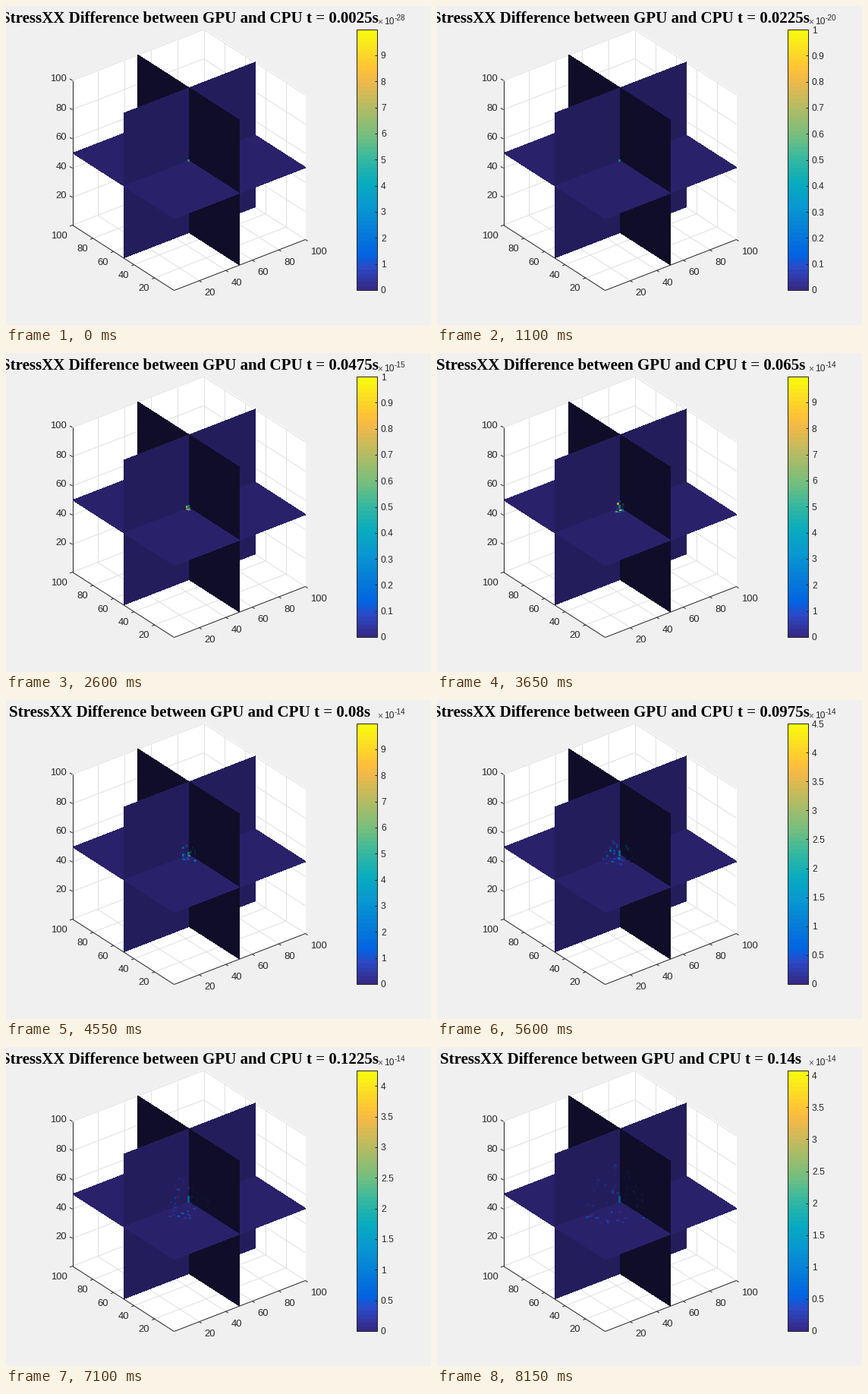
A matplotlib script for the animation above (8.3 s loop, 560 px wide and 420 px high).

```python
import math
import numpy as np
import matplotlib.pyplot as plt
from matplotlib.animation import FuncAnimation
from matplotlib.collections import LineCollection, PolyCollection
from matplotlib.colors import LinearSegmentedColormap
from matplotlib.patches import Polygon, Rectangle

W, H, DPI = 560, 420, 100
STEP_MS, FRAMES = 50, 166
INK, GRID = "#262626", "#dfdfdf"

# Projection: screen vectors of the three axes from the front bottom corner
ORIGIN = np.array([222, 374])
EX, EY, EZ = np.array([173, -67]), np.array([-134, -86]), np.array([0, -190.5])
TICKS = range(20, 101, 20)
MID = 49 / 99
SHADE = {"x": 0.30, "y": 0.68, "z": 0.79}

STOPS = {0: "#352a87", 5: "#2c4ac7", 8: "#0363e1", 20: "#0998d1", 26: "#0aacbe",
         32: "#38b99e", 37: "#71bf80", 51: "#f1b94a", 54: "#ffc337", 63: "#f9fb0e"}
cmap = LinearSegmentedColormap.from_list(
    "heat", [(i / 63, c) for i, c in STOPS.items()], N=64)

fig = plt.figure(figsize=(W / DPI, H / DPI), dpi=DPI, facecolor="#f0f0f0")
ax = fig.add_axes([0, 0, 1, 1])
ax.axis("off")


def proj(x, y, z):
    return ORIGIN + x * EX + y * EY + z * EZ


def shaded(value, face):
    return np.array(cmap(value)[:3]) * SHADE[face]


def text(x, y, s, size, ha="left", font="Liberation Sans", **kw):
    return ax.text(x, y, s, fontsize=size * 72 / DPI, ha=ha, va="baseline",
                   family=font, **{"color": INK, **kw})


def lines(segs, color, z):
    lc = LineCollection([np.array(s) + (-0.5, 0.5) for s in segs],
                        colors=color, linewidths=0.72, zorder=z)
    return ax.add_collection(lc)


def face_patch(corners, color, z):
    ax.add_patch(Polygon([proj(*p) for p in corners], fc=color, ec="none",
                         antialiased=False, zorder=z))


def plane(axis, at, u=(0, 1), v=(0, 1)):
    """Corners of a rectangle perpendicular to one axis."""
    pairs = [(u[0], v[0]), (u[1], v[0]), (u[1], v[1]), (u[0], v[1])]
    return [np.insert(np.array(p, float), axis, at) for p in pairs]


def draw_box():
    for axis, at in enumerate((1, 1, 0)):
        face_patch(plane(axis, at), "white", 1)
    grid, marks = [], []
    for t in TICKS:
        f = (t - 1) / 99
        for a, b, c in [((f, 0, 0), (f, 1, 0), (f, 1, 1)),
                        ((0, f, 0), (1, f, 0), (1, f, 1)),
                        ((0, 1, f), (1, 1, f), (1, 0, f))]:
            grid += [(proj(*a), proj(*b)), (proj(*b), proj(*c))]
        px, py, pz = proj(f, 0, 0), proj(0, f, 0), proj(0, 1, f)
        marks += [(px, px + (3, 2)), (py, py + (-3.5, 1.4)), (pz, pz + (-3.5, -2))]
        text(px[0] + 6.4, px[1] + 20, str(t), 13)
        text(py[0] - 7.5, py[1] + 18, str(t), 13, "right")
        text(pz[0] - 8, pz[1] + 1.7, str(t), 13, "right")
    lines(grid, GRID, 2)
    corners = [(0, 1, 1), (0, 1, 0), (0, 0, 0), (1, 0, 0)]
    edges = [(proj(*a), proj(*b)) for a, b in zip(corners, corners[1:])]
    lines(edges + marks, INK, 3)


def draw_slices():
    halves = [(0, MID), (MID, 1)]
    view = np.array([.527, .687, -.5])
    quads = [(name, plane(axis, MID, u, v)) for axis, name in enumerate("xyz")
             for u in halves for v in halves]
    quads.sort(key=lambda q: -np.mean(q[1], axis=0) @ view)
    for i, (name, corners) in enumerate(quads):
        face_patch(corners, shaded(0, name), 4 + i * 0.1)


def draw_bar():
    ax.imshow(np.linspace(1, 0, 64)[:, None], cmap=cmap, extent=(462, 489, 374, 31),
              aspect="auto", interpolation="nearest", zorder=5)
    ax.add_patch(Rectangle((461.5, 30.5), 27.5, 343, fc="none", ec=INK, lw=0.72, zorder=6))


draw_box()
draw_slices()
draw_bar()
ax.set_xlim(0, W)
ax.set_ylim(H, 0)
title = text(242, 22, "", 21, "center", "Liberation Serif", weight="bold", color="black")
text(489.5, 24.5, "×", 12, color="#555555")
text(498, 24.5, "10", 12)
power = text(512, 19, "", 10)
tick_texts = [text(494, 0, "", 12) for _ in range(12)]
bar_ticks = lines([], INK, 7)
cells = ax.add_collection(PolyCollection([], edgecolors="none", antialiased=False, zorder=6))


def color_limit(k):
    """Mantissa and exponent of the colour scale's upper end."""
    if k >= 36:
        return 4.5 - 0.025 * (k - 38), -14
    e = -13 - round(14 * max(0, 1 - k / 32) ** 2.4)
    # these powers of ten round to just below a whole decade
    return (9.99, e - 1) if e in (-27, -13) else (1, e)


def cell(face, a, b):
    """Grid cell a, b steps away from the centre on the near part of a slice."""
    c, d = proj(MID, MID, MID), 1 / 99
    u, v = {"x": (-EY, EZ), "y": (-EX, EZ), "z": (-EX, -EY)}[face]
    return [c + d * ((a + i) * u + (b + j) * v)
            for i, j in [(0, 0), (1, 0), (1, 1), (0, 1)]]


def noise(k):
    """Error specks spreading from the centre and fading as the wave grows."""
    rng = np.random.default_rng(k + 7)
    radius = 13 * (k / 38) ** 2
    level = 0.5 / (1 + (k / 28) ** 4)
    verts, colors = [], []

    def add(face, a, b, value):
        verts.append(cell(face, a, b))
        colors.append(shaded(min(value, 1.0), face))

    for face in "xyz":
        for _ in range(int(radius * 1.2)):
            r = radius * math.sqrt(rng.random())
            ang = rng.uniform(0, math.pi / 2)
            add(face, int(r * math.cos(ang)), int(r * math.sin(ang)),
                level * rng.exponential())
    for j in range(1 + k // 16):
        add("y", 0, j, 0.5 - 0.005 * k)
    return verts, colors


def update(i):
    k = (i + 2) // 3
    title.set_text(f"StressXX Difference between GPU and CPU t = {0.0025 * (k + 1):.4g}s")
    top, e = color_limit(k)
    power.set_text(str(e))
    step = 0.1 if top <= 1 else 0.5 if top < 5 else 1
    segs = []
    for n, label in enumerate(tick_texts):
        shown = n * step <= top + 1e-9
        label.set_text(f"{n * step:g}" if shown else "")
        if shown:
            y = 374 - 343 * n * step / top
            label.set_y(y + 4.5)
            segs.append([(485.5, y), (489, y)])
    bar_ticks.set_segments(segs)
    verts, colors = noise(k)
    cells.set_verts(verts)
    cells.set_facecolor(colors)
    return []


anim = FuncAnimation(fig, update, frames=FRAMES, interval=STEP_MS,
                     repeat=True, repeat_delay=0, blit=False)
plt.show()
```
